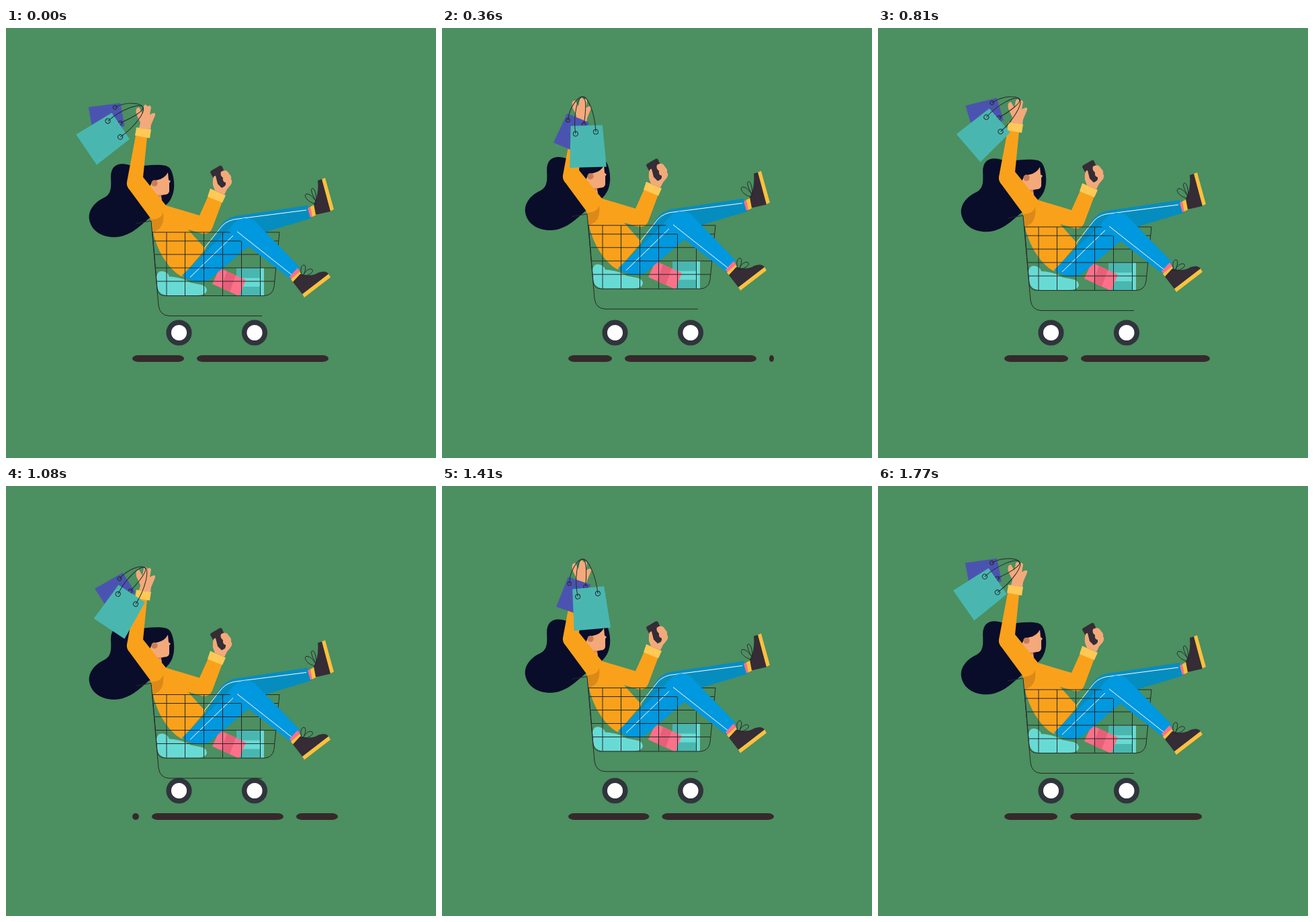
Animation of 640 by 640 pixels, one loop 1.8 s. Source, as an HTML page:

```html
<!DOCTYPE html>
<html>
<head>
<meta charset="utf-8">
<style>
  html, body { margin: 0; width: 100%; height: 100%; overflow: hidden; background: #4c8f60; }
  svg { display: block; width: 100vw; height: 100vh; }
  .line { fill: none; stroke: #26282b; stroke-width: 1; }
  .seam { fill: none; stroke: #fff; stroke-width: 1; }
  .skin { fill: #f4a97a; }
  .shirt { fill: #faa11b; }
  .cuff { fill: #fec956; }
  .dark { fill: #352c36; }
  .sole { fill: #fdc13d; }
  .pink { fill: #fb7189; }
  .jeans { fill: #0098de; }
  .aqua { fill: #68dad4; }
  .teal { fill: #49b7b0; }
</style>
</head>
<body>
<svg viewBox="0 0 640 640">
  <g id="shadow" fill="#36292b"></g>
  <g fill="#fff" stroke="#30343c" stroke-width="7.5">
    <circle cx="257.5" cy="453.5" r="15.3"/>
    <circle cx="370" cy="453.5" r="15.3"/>
  </g>
  <g id="rider">
    <!-- hair and head -->
    <path fill="#090d29" d="M238 205C226 202 206 205 190 206C170 198 156 202 156 222C157 241 156 248 143 254C128 262 122 275 124 285C127 303 145 313 166 311C186 309 200 294 212 284L236 265C250 255 252 237 249 222C247 212 244 207 238 205Z"/>
    <path class="skin" d="M241 215L242 226 245 228 243 231V243Q242 248 236 248L231 249 233 266 219 254 214 240Q214 228 226 226 236 224 241 215Z"/>
    <path fill="#d98a60" d="M217 247Q224 250 231 248V253Z"/>
    <circle cx="221" cy="231" r="4.7" fill="#c77d56"/>

    <!-- goods -->
    <path class="aqua" d="M224 371Q225 361 233 362 241 363 243 370 262 371 275 379L290 382Q299 384 299 391 297 398 285 398H240Q222 397 224 371Z"/>
    <path class="teal" d="M343 357H384V398H343Z"/>
    <path class="aqua" d="M343 372H384V385H343ZM378 357H384V398H378Z"/>
    <path class="pink" d="M318 357L357 375 347 399 307 381Z"/>
    <path fill="#e85f79" d="M329 362L342 368 333 393 320 387Z"/>

    <!-- far leg -->
    <path fill="#058dc0" d="M288 345L320 293Q330 280 348 279L449 264 455 283 385 304 340 320Z"/>
    <path class="pink" d="M449 268L454 266 458 280 453 282Z"/>
    <path class="sole" d="M453 266L459 263 464 277 456 281ZM470 225L475 223 488 270 482 273Z"/>
    <path class="dark" d="M464 227L470 225 483 273 461 278 458 262Q466 248 464 227Z"/>
    <path class="line" d="M462 262C446 259 442 247 448 247S458 254 462 259C452 242 454 238 457 239S462 249 462 258"/>

    <!-- shirt, arms -->
    <path class="shirt" d="M193 160L180 229Q179 236 184 241L215 283 219 305C226 335 244 361 262 370L297 329 271 300 292 306Q303 308 307 298L322 258 301 250 288 279 238 264 204 222 210 162Z"/>
    <path fill="#db8918" d="M216 285Q231 285 234 274 236 291 228 299L219 304Z"/>
    <path class="cuff" d="M194 148L216 151 214 164 192 160ZM304 239L327 249 322 260 300 251Z"/>
    <path class="skin" d="M198 149L200 141 194 128Q192 118 198 118L203 127 205 116Q208 112 210 116L211 117Q214 113 216 118L214 129 218 127Q223 125 222 130L216 144 215 151Z"/>
    <path class="dark" d="M306 212L318 205Q321 204 322 207L332 230Q332 232 330 233L319 239Q317 239 316 237L304 215Q304 213 306 212Z"/>
    <path class="skin" d="M311 242L308 234Q307 219 312 220L315 232 321 238Q328 236 327 230 322 229 323 223 318 219 320 214 328 209 332 217 336 220 335 225 338 229 334 234L329 240 325 248Z"/>

    <!-- near thigh -->
    <path class="jeans" d="M262 368L330 302Q345 281 358 281L380 305 361 325 303 374Q286 385 262 368Z"/>
    <path class="seam" d="M295 328L322 294Q331 285 346 284L447 271M274 371L338 309"/>

    <path class="line" id="basket"/>

    <!-- near shin -->
    <path class="jeans" d="M331 302Q348 274 370 287L437 356 424 374 361 325 350 317Z"/>
    <path class="seam" d="M344 303L425 367"/>
    <path class="pink" d="M422 370L434 357 438 363 426 375Z"/>
    <path class="sole" d="M424 374L437 363 441 368 428 379ZM441 396L480 366 483 371 444 401Z"/>
    <path class="dark" d="M427 378L438 366Q455 371 465 364 476 360 480 366L441 396Z"/>
    <path class="line" d="M441 370C436 357 441 352 444 353S446 362 442 369C446 359 454 357 456 360S453 367 443 370"/>
  </g>
  <g id="bags">
    <path fill="#4a54b0" d="M-24.3 20.8L6.9 37-13 81-48.6 62Z"/>
    <g class="line">
      <circle cx="-24" cy="31" r="2.8"/>
      <circle cx="-1" cy="39" r="2.8"/>
      <path d="M-24 31C-20 10-5-3 1-2S4 20-1 39"/>
    </g>
    <path class="teal" d="M-20.7 39.7L26.4 42.8 26.6 105.2-28 101.5Z"/>
    <g class="line">
      <circle cx="-14.6" cy="52" r="3.5"/>
      <circle cx="15.6" cy="52" r="3.5"/>
      <path d="M-14.6 52C-16 25-7-2 1-2S17 25 15.6 52"/>
    </g>
  </g>
</svg>
<script>
const $ = id => document.getElementById(id);
const smooth = x => x * x * (3 - 2 * x);
const CYCLE = 900;

// time, height of the basket rim
const bumps = [[0, 304], [180, 310.5], [390, 292.8], [655, 310.7], [762, 292.8], [CYCLE, 304.5]];

function rimAt(t) {
  const i = bumps.findIndex(b => b[0] > t);
  const [t0, y0] = bumps[i - 1], [t1, y1] = bumps[i];
  return y0 + (y1 - y0) * smooth((t - t0) / (t1 - t0));
}

function drawBasket() {
  let d = "M193 291L216 287 227 413Q229 428 243 428.5H381" +
    "M217 304H407L399 385Q397 398 384 398.5H237Q226 398 225 388L218 304";
  for (const y of [317, 337, 357, 377]) {
    const k = y - 304;
    d += `M${218.5 + k * .083} ${y}H${407 - k * .099}`;
  }
  for (const x of [239, 266.5, 294.5, 322.5, 350.5, 378.5]) d += `M${x} 304V398`;
  $("basket").setAttribute("d", d);
}

function drawShadow(t) {
  const left = 188, right = 494, step = 215, gap = 19;
  const start = 265 - 3 * step * smooth(t / CYCLE);
  let out = "";
  for (let k = -2; k < 5; k++) {
    const a = Math.max(left, start + gap + k * step);
    const b = Math.min(right, start + (k + 1) * step);
    if (b > a) out += `<rect x="${a}" y="487" width="${b - a}" height="10" rx="9" ry="5"/>`;
  }
  $("shadow").innerHTML = out;
}

function frame(now) {
  const t = Math.floor(now / 30) * 30 % CYCLE;
  const rim = rimAt(t);
  $("rider").setAttribute("transform", `translate(0 ${rim - 304})`);

  // the grip slides along the hand, then snaps back each cycle
  const slip = smooth(Math.min(t / 360, 1));
  const swing = 52 - 64 * smooth(1 - Math.abs(t / 450 - 1));
  $("bags").setAttribute("transform",
    `translate(${201.5 + 7 * slip} ${rim - 186 - 3.5 * slip}) rotate(${swing})`);
  drawShadow(t);
}

function loop() {
  frame(performance.now());
  requestAnimationFrame(loop);
}

drawBasket();
loop();
</script>
</body>
</html>
```
